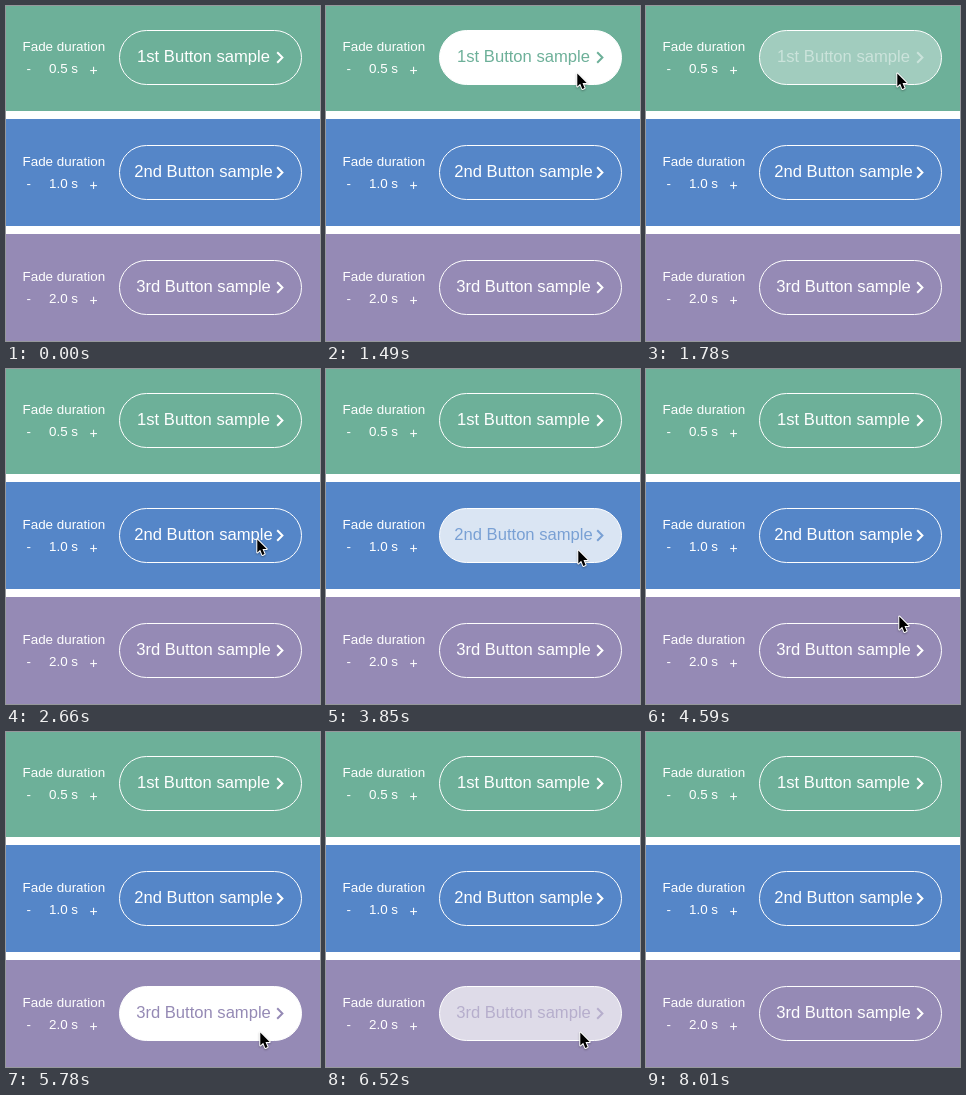
An HTML page with a canvas for the animation above (8410 ms loop, 314 by 335 pixels).

```html
<!DOCTYPE html>
<html lang="en">
<head>
<meta charset="utf-8">
<title>Button fade samples</title>
<style>
  html, body { margin: 0; width: 100%; height: 100%; overflow: hidden; background: #fff; }
  canvas { display: block; width: 314px; height: 335px; }
</style>
</head>
<body>
<canvas id="stage"></canvas>
<script>
const W = 314, H = 335, LOOP = 8410, PITCH = 115;
const TICK = 148.2, LEAD = 10; // the picture refreshes once per tick
const canvas = document.getElementById('stage');
const ctx = canvas.getContext('2d');
const dpr = window.devicePixelRatio || 1;
canvas.width = W * dpr;
canvas.height = H * dpr;

const rows = [
  { rgb: [109, 176, 153], title: '1st Button sample', seconds: 0.5, press: 1480 },
  { rgb: [85, 134, 200], title: '2nd Button sample', seconds: 1, press: 3555 },
  { rgb: [149, 138, 181], title: '3rd Button sample', seconds: 2, press: 5778 }
];

// Pointer trips: each eases from the last stop to the next
const entry = { x: 401, y: 157 };
const trips = [
  { start: 290, end: 890, x: 250, y: 66 },
  { start: 2238, end: 3260, x: 250.5, y: 180 },
  { start: 4424, end: 5180, x: 253, y: 299 },
  { start: 7200, end: 8000, x: 253, y: 350 }
];

const clamp = k => Math.min(1, Math.max(0, k));
const smooth = k => k * k * (3 - 2 * k);
const settle = k => smooth(1 - (1 - k) ** 3);

function pointerAt(t) {
  let { x, y } = entry;
  for (const trip of trips) {
    const k = settle(clamp((t - trip.start) / (trip.end - trip.start)));
    x += (trip.x - x) * k;
    y += (trip.y - y) * k;
  }
  return [Math.round(x), Math.round(y)];
}

function highlight(t, row) {
  if (t < row.press) return 0;
  return 1 - smooth(clamp((t - row.press) / (row.seconds * 1000)));
}

function mix(rgb, k) {
  return `rgb(${rgb.map(c => Math.round(255 + (c - 255) * k)).join(',')})`;
}

function label(text, x, y, size = 13.4, align = 'left') {
  ctx.font = `${size}px "Liberation Sans", Arial, sans-serif`;
  ctx.textAlign = align;
  ctx.fillText(text, x, y);
}

function drawControls(row) {
  ctx.fillStyle = '#fff';
  label('Fade duration', 16.5, 45);
  label('-', 20.6, 67);
  label(`${row.seconds.toFixed(1)} s`, 43, 67);
  label('+', 83.5, 69, 14);
}

function drawButton(row, a) {
  ctx.beginPath();
  ctx.roundRect(113.5, 24.5, 182, 54, 27);
  // Near-white fills read as pure white
  ctx.fillStyle = `rgba(255,255,255,${a > 0.85 ? 1 : a})`;
  ctx.fill();
  ctx.strokeStyle = '#fff';
  ctx.lineWidth = 1;
  ctx.stroke();

  ctx.fillStyle = ctx.strokeStyle = mix(row.rgb, a);
  label(row.title, 197.5, 56, 16.6, 'center');

  ctx.lineWidth = 2;
  ctx.beginPath();
  ctx.moveTo(271.2, 46.3);
  ctx.lineTo(276.4, 51.5);
  ctx.lineTo(271.2, 56.7);
  ctx.stroke();
}

const arrow = new Path2D('M1.3 1.5V14.6L4.2 11.8L6.3 17L8.6 16L6.5 11H10.7Z');

function drawPointer([x, y]) {
  ctx.save();
  ctx.translate(x, y);
  ctx.lineJoin = 'round';
  ctx.lineWidth = 2;
  ctx.strokeStyle = '#fff';
  ctx.shadowColor = 'rgba(0,0,0,0.3)';
  ctx.shadowBlur = 2 * dpr;
  ctx.shadowOffsetY = dpr;
  ctx.stroke(arrow);
  ctx.shadowColor = 'transparent';
  ctx.fillStyle = '#000';
  ctx.fill(arrow);
  ctx.restore();
}

function draw(t) {
  ctx.setTransform(dpr, 0, 0, dpr, 0, 0);
  ctx.fillStyle = '#fff';
  ctx.fillRect(0, 0, W, H);
  rows.forEach((row, i) => {
    ctx.save();
    ctx.translate(0, i * PITCH);
    ctx.fillStyle = mix(row.rgb, 1);
    ctx.fillRect(0, -2, W, 107);
    drawControls(row);
    drawButton(row, highlight(t, row));
    ctx.restore();
  });
  drawPointer(pointerAt(t));
}

const start = performance.now();
function frame() {
  const t = (performance.now() - start) % LOOP;
  draw(Math.floor((t + LEAD) / TICK) * TICK);
  requestAnimationFrame(frame);
}
frame();
</script>
</body>
</html>
```
